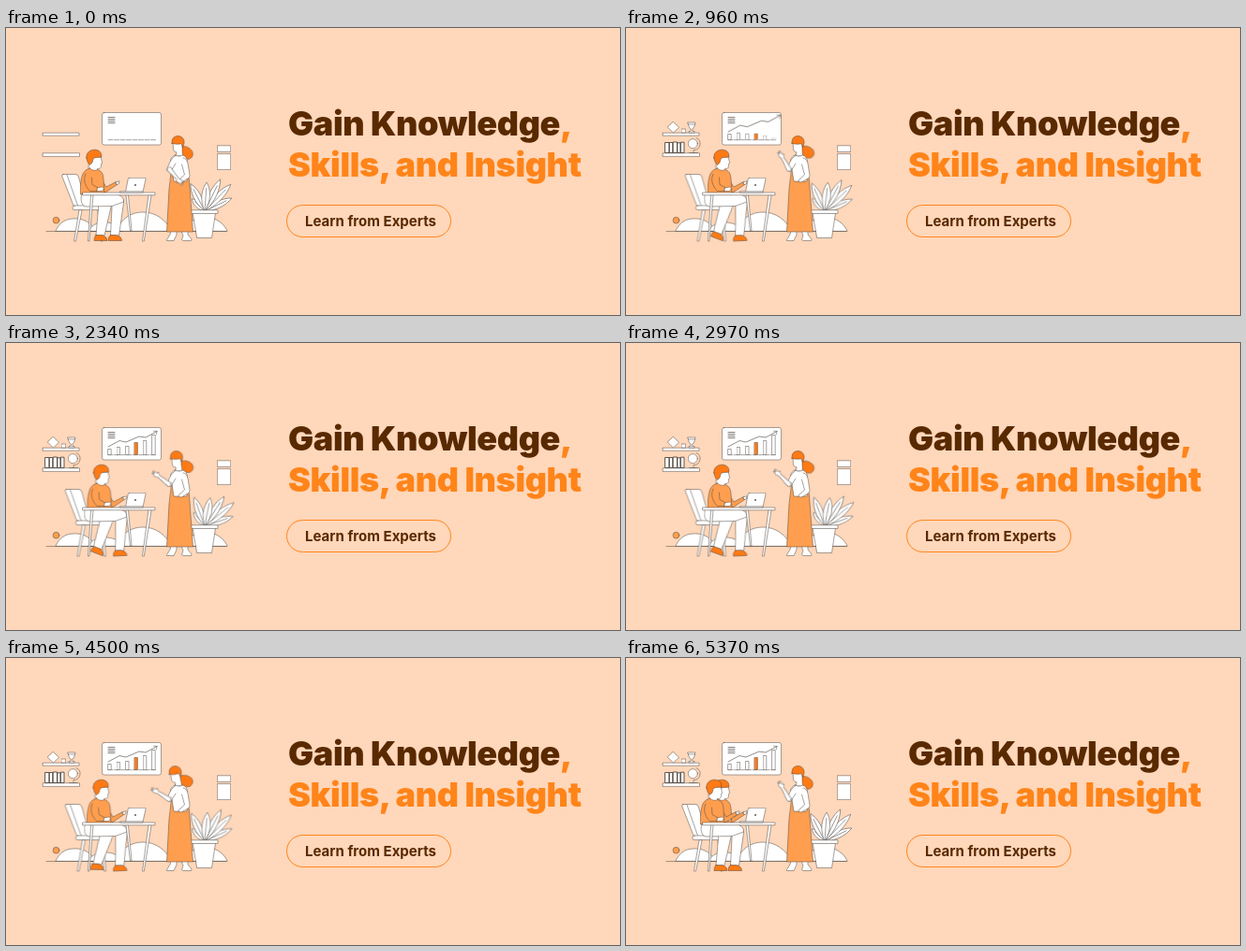
Recreate the animation shown at these times as an HTML page. Size 655 px wide and 307 px high, loop 5.4 s.

```html
<!DOCTYPE html>
<html lang="en">
<head>
<meta charset="utf-8">
<title>Gain Knowledge, Skills, and Insight</title>
<style>
  html, body { margin: 0; width: 100%; height: 100%; overflow: hidden; background: #ffd7ba; }
  svg { display: block; width: 655px; height: 307px; }
  text { font-family: Inter, "Open Sans", sans-serif; }
  .title { font-size: 36px; font-weight: 900; letter-spacing: -.01em; fill: #ff8419; }
  .dark { fill: #592900; }
  .label { font-size: 15px; font-weight: 700; }
  .art { fill: #fff; stroke: #4d4640; stroke-width: .5; stroke-linejoin: round; stroke-linecap: round; }
  .cloth { fill: #ff9e4f; }
  .hot { fill: #ff7a14; }
  .line { fill: none; }

  .art g, .ghost { animation: 5.4s ease-in-out infinite; }
  .grow { transform-box: fill-box; transform-origin: 50% 100%; }

  .art .lean { animation-name: lean; }
  @keyframes lean {
    0%, 1% { transform: none; }
    9%, 17.8% { transform: translateX(8px); }
    32.8% { transform: translateX(7.2px); }
    55%, 72.8% { transform: translateX(8px); }
    83.3% { transform: translateX(7.2px); }
    98.5% { transform: translateX(8px); animation-timing-function: step-start; }
    98.6%, 100% { transform: none; }
  }
  .art .chair { animation-name: chair; }
  @keyframes chair {
    0%, 1% { transform: none; }
    9%, 98.5% { transform: translateX(3.5px); }
    98.6%, 100% { transform: none; }
  }
  .ghost { animation-name: ghost; animation-timing-function: step-end; transform: translateX(8px); }
  @keyframes ghost {
    0% { visibility: hidden; }
    98.5%, 100% { visibility: visible; }
  }
  .art .near { animation-name: near; transform-origin: 122px 182px; }
  @keyframes near {
    0%, 1% { transform: none; }
    9%, 98.5% { transform: translateX(3.5px) rotate(-2.5deg); }
    98.6%, 100% { transform: none; }
  }
  .art .far { animation-name: far; transform-origin: 108px 182px; }
  @keyframes far {
    0%, 1% { transform: none; }
    9%, 98.5% { transform: translateX(3px) rotate(9deg); }
    98.6%, 100% { transform: none; }
  }
  .art .tap { animation-name: tap; transform-origin: 104px 226px; }
  @keyframes tap {
    0%, 1% { transform: none; }
    17.8% { transform: rotate(12deg); }
    32.8% { transform: rotate(14deg); }
    55% { transform: rotate(11deg); }
    72.8% { transform: rotate(4deg); }
    83.3%, 98.5% { transform: rotate(-8deg); }
    98.6%, 100% { transform: none; }
  }
  .art .wave { animation-name: wave; transform-origin: 174px 151px; }
  @keyframes wave {
    0%, .6% { transform: rotate(-132deg); }
    12% { transform: rotate(55deg); }
    17.8% { transform: rotate(59deg); }
    32.8% { transform: rotate(30deg); }
    55% { transform: rotate(43deg); }
    64% { transform: rotate(48deg); }
    72.8% { transform: rotate(43deg); }
    83.3% { transform: rotate(30deg); }
    99.4%, 100% { transform: rotate(59deg); }
  }
  .art .head { animation-name: nod; transform-origin: 184px 136px; }
  @keyframes nod {
    0%, 17.8%, 55%, 72.8%, 99.4%, 100% { transform: none; }
    32.8%, 83.3% { transform: translateX(-1px) rotate(-8deg); }
  }
  .art .tail { animation-name: tail; transform-origin: 188px 126px; }
  @keyframes tail {
    0%, 100% { transform: rotate(6deg); }
    17.8%, 55%, 83.3% { transform: rotate(-3deg); }
    32.8%, 72.8% { transform: none; }
  }
  .art .leaves { animation-name: sway; transform-origin: 212px 196px; }
  @keyframes sway {
    0%, 100% { transform: rotate(0); }
    45% { transform: rotate(7deg); }
  }
  .trend { stroke: #77706a; stroke-width: .8; stroke-dasharray: 1; animation: draw 5.4s infinite; transform-origin: 109px 111px; }
  @keyframes draw {
    0%, 4% { stroke-dashoffset: 1; visibility: hidden; transform: scale(1.07); }
    4.1% { stroke-dashoffset: 1; visibility: visible; }
    16% { stroke-dashoffset: 0; }
    18% { transform: scale(1.07); }
    31%, 100% { stroke-dashoffset: 0; transform: none; }
  }
  .tip { animation: tip 5.4s infinite; transform-origin: 109px 111px; }
  @keyframes tip {
    0%, 14% { opacity: 0; transform: scale(1.07); }
    16% { opacity: 1; }
    18% { transform: scale(1.07); }
    31%, 100% { opacity: 1; transform: none; }
  }
</style>
</head>
<body>
<svg viewBox="0 0 655 307">
  <text class="title" x="301" y="115"><tspan class="dark">Gain Knowledge</tspan>,</text>
  <text class="title" x="301" y="159">Skills, and Insight</text>
  <rect x="299.5" y="189.5" width="175" height="34" rx="17" fill="none" stroke="#ff8419"/>
  <text class="label dark" x="319" y="212">Learn from Experts</text>

  <g class="art">
    <!-- Ground -->
    <path d="M53 217C57 208 64 204 72 204 83 203 91 209 96 217Z"/>
    <path d="M178 217C184 207 193 203 204 207 215 199 230 204 236 217Z"/>
    <path d="M88 217C92 210 99 207 108 208 117 209 121 212 124 217Z"/>
    <path d="M118 217C123 203 134 197 146 197 160 197 170 205 177 217Z"/>
    <circle cx="53.5" cy="205.7" r="3.4" class="cloth"/>
    <path class="line" d="M43 217.5H235"/>

    <!-- Shelves -->
    <rect x="39.5" y="112.2" width="38.5" height="3"/>
    <rect x="39.5" y="133.8" width="39" height="3.6"/>
    <path class="grow" data-in="240,720" d="M50.5 100.5L56.5 106.3 50.5 112 44.5 106.3Z"/>
    <rect class="grow" data-in="360,780" x="59.3" y="108" width="4.4" height="4"/>
    <path class="grow" data-in="420,840" d="M66 101H74L73 105Q72.5 107.5 70.8 108V110.5H73V112H67V110.5H69.2V108Q67.5 107.5 67 105ZM66.5 103H73.5"/>
    <path class="grow" stroke-width=".9" data-in="300,820" d="M42 122.5H46V133.5H42ZM46.6 122.5H49.8V133.5H46.6ZM50.5 122H54.5V133.5H50.5ZM55.2 122.8H58V133.5H55.2ZM58.7 122.2H62V133.5H58.7Z"/>
    <g class="grow" data-in="480,900">
      <path class="line" d="M75 117.5A6.8 6.8 0 0 1 72 130.5V133.5M67.5 133.5H76.5"/>
      <circle cx="71.3" cy="123.7" r="5"/>
    </g>

    <!-- Board -->
    <rect x="102.5" y="90.5" width="63" height="34.5" rx="2.2"/>
    <path class="line" stroke-width=".7" d="M109 95.5H116M109 97.5H116M109 99.5H116M109 101.5H116"/>
    <path class="line" stroke-dasharray="5 1.5" d="M109 119.7H160"/>
    <g id="bars"></g>
    <path class="line trend" pathLength="1" d="M109 111L121 104.5 128 106 142 100 149 101 161 94.5"/>
    <path class="line tip" d="M157.5 94.2L161.2 94.3 160.3 97.8"/>

    <!-- Pictures -->
    <rect x="225.7" y="125.8" width="14" height="6.7"/>
    <rect x="225.7" y="134.6" width="14" height="17"/>

    <!-- Plant -->
    <g class="leaves" id="leaves"></g>
    <path d="M199.5 198H223.5L219.5 224.5H204Z"/>
    <rect x="197" y="194.8" width="29" height="3.6"/>

    <!-- Woman -->
    <path d="M176 217L175 221 171.5 226.5V227.5H179L182 221V217ZM187 217L189 222 187.5 226.5 189 227.5H197.5L198 226 194 221V217Z"/>
    <path class="cloth" d="M177 150H193.5L195.5 163 199.5 218H171.5L174 172Z"/>
    <g class="head">
      <g class="tail"><path class="hot" d="M187.5 127C191 125.5 196 127 199 130.5 201.5 134 200 138.5 196 139.5 191 140 187 137 186.5 132Z"/></g>
      <path d="M178.5 121H188V131L188.5 137H181.5L182 132.8C178.8 133 178.3 130 178.3 126Z"/>
      <path class="hot" d="M177 123.5C176.5 117.5 180 115.3 184 115.5 188.5 116 190.5 119.5 190 123.5L188.6 127.5 187 123.8Q182 125 177 123.5Z"/>
    </g>
    <path d="M180.5 136C183 137.5 186 137.5 188.5 136 192 137 193.5 140 193.5 144L193 164H179L177 151 175.5 142Q176 137.5 180.5 136Z"/>
    <path d="M189 139C192.5 139.5 194 143 194.5 148L196 157.5Q196 160 194 161L187 165 184 164.5 184.5 162.5 190.5 157 187.5 146"/>
    <path d="M180.5 137C176 139.5 174 145 171.8 151Q172 154 175.5 153.5L181 145"/>
    <g class="wave">
      <path d="M175 148.8L160 149.3 157.3 147.2 157.2 148.9 152.2 149.2 151.8 150.4 155 150.8 152.2 152.2 157 153.2 160 152 174.8 153.7Q177.5 151.3 175 148.8Z"/>
    </g>

    <!-- Chair -->
    <g class="chair">
      <path d="M78 195L72.5 228H74.5L81 195ZM98 195L101 228H103L101 195Z"/>
      <path d="M61 156.5H74Q76.5 156.5 77.3 159L85.5 188Q86 191 83 191H74Q72 191 71.5 188.5L59.8 158.5Q59.5 156.5 61 156.5Z"/>
      <path class="line" d="M65 157L76.5 190"/>
      <rect x="71" y="190" width="30" height="4.6" rx="2"/>
    </g>

    <!-- Man -->
    <use href="#body" class="ghost"/>
    <g class="near">
      <path d="M112 181C120 179 126 180 125.5 187L120.5 222H111.5L113 192Z"/>
      <path class="hot" d="M111.5 221.5H117.5Q123.5 223 123.5 227.5H109Q108.5 224 111.5 221.5Z"/>
    </g>
    <g class="far">
      <path d="M98 181C108 178 114 180 113 187L105 222H96L98.5 193Z"/>
      <g class="tap"><path class="hot" d="M96 221.5H103Q108 223.5 108 227.5H94Q93.5 224 96 221.5Z"/></g>
    </g>
    <g class="chair">
      <path d="M81 177H107C119 177 126 179 125.5 186L113 190.5 85 191C80 190 79 182 81 177Z"/>
    </g>
    <g class="lean">
      <g id="body">
        <path class="cloth" d="M99 158L107 170 117.5 164.5 118.5 167.5 106 176 98 172Z"/>
        <path d="M117 164.8L121 163.8 120.5 166.5 118.3 167.5Z"/>
        <path d="M88.5 138H101.3L102.6 144.5 101.5 145.2C101.7 149 101 150.8 97.5 150.5L97.8 154 88.5 154Z"/>
        <path class="hot" d="M85.8 139C85.3 133 90 130 95 130.2 100 130.7 102.3 133.5 101.8 138 98 138.5 95 137.8 93 140.2L92 144 89.5 146.5Q86.5 144 85.8 139Z"/>
        <path class="cloth" d="M89.5 150C92 152.5 95 152.8 97.5 151.5 102 153 103.5 155.5 104 161L105 178H79.5C79 168 80 160 82.5 155Q85 151 89.5 150Z"/>
        <path class="cloth" d="M85 156C82 162 84 169 89.5 174.5H97.5L98.5 171 92 167.5 91.5 160"/>
        <path d="M97.8 170.8L102.5 170 104.5 171.8 102.5 174.5H97Z"/>
      </g>
    </g>

    <!-- Table -->
    <path d="M90.5 179L87.5 228H89L93 179ZM128 179L132.5 217H134L130.5 179ZM152 179L145.5 228H147.3L155 179Z"/>
    <rect x="82" y="176" width="77" height="2.8"/>
    <path d="M131.5 160.3H148Q149.2 160.3 149 161.5L146 175.5H127.5L130.3 161.3Q130.5 160.3 131.5 160.3Z"/>
    <circle cx="138" cy="168" r=".9" fill="#4d4640" stroke="none"/>
    <path d="M122 174.8H146V176H122Z"/>
  </g>
</svg>
<script>
  const LOOP = 5400;
  const make = (parent, tag, attrs) => {
    const el = document.createElementNS("http://www.w3.org/2000/svg", tag);
    for (const key in attrs) el.setAttribute(key, attrs[key]);
    parent.append(el);
  };

  const bars = document.getElementById("bars");
  [6, 8, 9, 13, 15, 21].forEach((h, i) => {
    const start = 300 + 120 * i;
    make(bars, "rect", {
      class: i === 3 ? "grow hot" : "grow", "data-in": `${start},${start + 600}`,
      x: 109 + 9.4 * i, y: 119.5 - h, width: 3.2, height: h
    });
  });

  // Angle from vertical, length and half width of each leaf
  const leaves = document.getElementById("leaves");
  [[-46, 19, 3.5], [64, 32, 4], [-27, 33, 4.5], [44, 40, 4.5], [26, 38, 4.5], [4, 31, 5]]
    .forEach(([turn, len, w]) => make(leaves, "path", {
      transform: `translate(212 196) rotate(${turn})`,
      d: `M0 0C${-w * 1.3} ${-len * .4} ${-w} ${-len * .75} 0 ${-len}C${w} ${-len * .75} ${w * 1.3} ${-len * .4} 0 0V${-len * .8}`
    }));

  // Each part rises from its base between its own start and end time
  for (const el of document.querySelectorAll("[data-in]")) {
    const [from, to] = el.dataset.in.split(",").map(t => t / LOOP);
    const flat = "scaleY(0)", full = "scaleY(1)";
    const anim = el.animate([
      { transform: flat, offset: 0 }, { transform: flat, offset: from },
      { transform: full, offset: to }, { transform: full, offset: 1 }
    ], { duration: LOOP, iterations: Infinity });
    anim.startTime = document.timeline.currentTime;
  }
</script>
</body>
</html>
```
